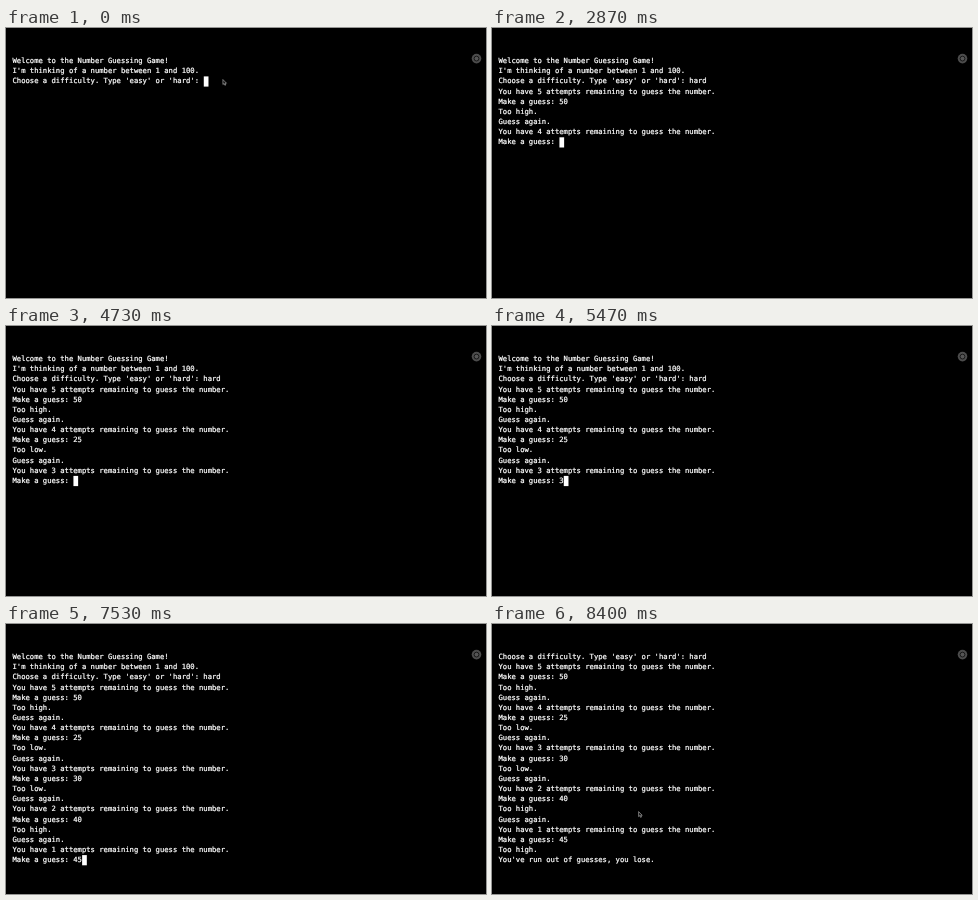
Animation of 480 by 270 pixels, one loop 8540 ms. Source, as an HTML page:

```html
<!DOCTYPE html>
<html lang="en">
<head>
<meta charset="utf-8">
<title>Number guessing game</title>
<style>
  html, body { margin: 0; width: 100%; height: 100%; overflow: hidden; background: #000; }
  svg { display: block; width: 100vw; height: 100vh; }
  text {
    font: 7.217px "DejaVu Sans Mono", monospace;
    fill: #fff;
    stroke: #fff;
    stroke-width: .24px;
    white-space: pre;
    text-rendering: geometricPrecision;
  }
</style>
</head>
<body>
<svg viewBox="0 0 480 270">
  <rect width="480" height="270" fill="#000"/>
  <g>
    <circle cx="470.5" cy="30.6" r="4.8" fill="#4c4c4c"/>
    <circle cx="470.5" cy="30.6" r="2.4" fill="#565656" stroke="#181818" stroke-width="1"/>
  </g>
  <g id="lines"></g>
  <rect id="cursor" x=".1" width="4.7" height="10.2" fill="#fff"/>
  <path id="pointer" d="M0 0V5L1.2 4L2 5.8L2.9 5.4L2.1 3.7H3.6Z"
        fill="#111" stroke="#bbb" stroke-width=".6"/>
</svg>
<script>
const LOOP = 8540, STEP = 200 / 3;
const LEFT = 6.5, TOP = 28.1, COL = 4.345, ROW = 10.15, ROWS = 21, BASE = 7;
const $ = id => document.getElementById(id);

const prompt = n => `You have ${n} attempts remaining to guess the number.\nMake a guess: `;
const reply = (word, n) => `\nToo ${word}.\nGuess again.\n` + prompt(n);

// Terminal output: [time, appended text]
const output = [
  [0, "Welcome to the Number Guessing Game!\nI'm thinking of a number between 1 and 100.\n" +
      "Choose a difficulty. Type 'easy' or 'hard': "],
  [400, "h"], [470, "a"], [600, "r"], [670, "d"], [1400, "\n" + prompt(5)],
  [2400, "5"], [2470, "0"], [2870, reply("high", 4)],
  [4470, "2"], [4530, "5"], [4730, reply("low", 3)],
  [5470, "3"], [5730, "0"], [6130, reply("low", 2)],
  [6730, "40"], [6930, reply("high", 1)],
  [7470, "4"], [7530, "5"],
  [7870, "\nToo high.\nYou've run out of guesses, you lose."]
];
const END = 7870;

// Pointer appearances: it moves in steps, rests, and hides on typing
const moves = [
  { start: 0, hide: 400, steps: 1, from: [216.9, 51.5], to: [216.9, 51.5] },
  { start: 3670, hide: 4470, steps: 7, from: [45, 110], to: [173, 140] },
  { start: 4930, hide: 5470, steps: 4, from: [58, 113], to: [123, 154] },
  { start: 8200, hide: LOOP, steps: 4, from: [176, 223], to: [146.6, 187.6] }
];

const rows = Array.from({ length: ROWS }, (_, i) => {
  const row = document.createElementNS("http://www.w3.org/2000/svg", "text");
  row.setAttribute("x", LEFT);
  row.setAttribute("y", TOP + i * ROW + BASE);
  return $("lines").appendChild(row);
});

function show(el, visible, x, y) {
  el.setAttribute("visibility", visible ? "visible" : "hidden");
  if (visible) el.setAttribute("transform", `translate(${x} ${y})`);
}

function drawTerminal(t) {
  const text = output.filter(([at]) => at <= t).map(([, part]) => part).join("");
  const lines = text.split("\n").slice(-ROWS);
  rows.forEach((row, i) => {
    const line = lines[i] || "";
    if (row.textContent !== line) row.textContent = line;
  });
  const last = lines.length - 1;
  show($("cursor"), t < END, LEFT + lines[last].length * COL, TOP + last * ROW);
}

function drawPointer(t) {
  const move = moves.find(m => t >= m.start && t < m.hide);
  if (!move) return show($("pointer"), false);
  const { start, steps, from, to } = move;
  const step = Math.min(steps - 1, Math.floor((t - start) / STEP + 0.05));
  const p = steps > 1 ? step / (steps - 1) : 1;
  show($("pointer"), true, ...from.map((v, i) => v + (to[i] - v) * p));
}

function draw(t) {
  drawTerminal(t);
  drawPointer(t);
}

const begin = performance.now();
function tick() {
  draw((performance.now() - begin) % LOOP);
  requestAnimationFrame(tick);
}
tick();
</script>
</body>
</html>
```
